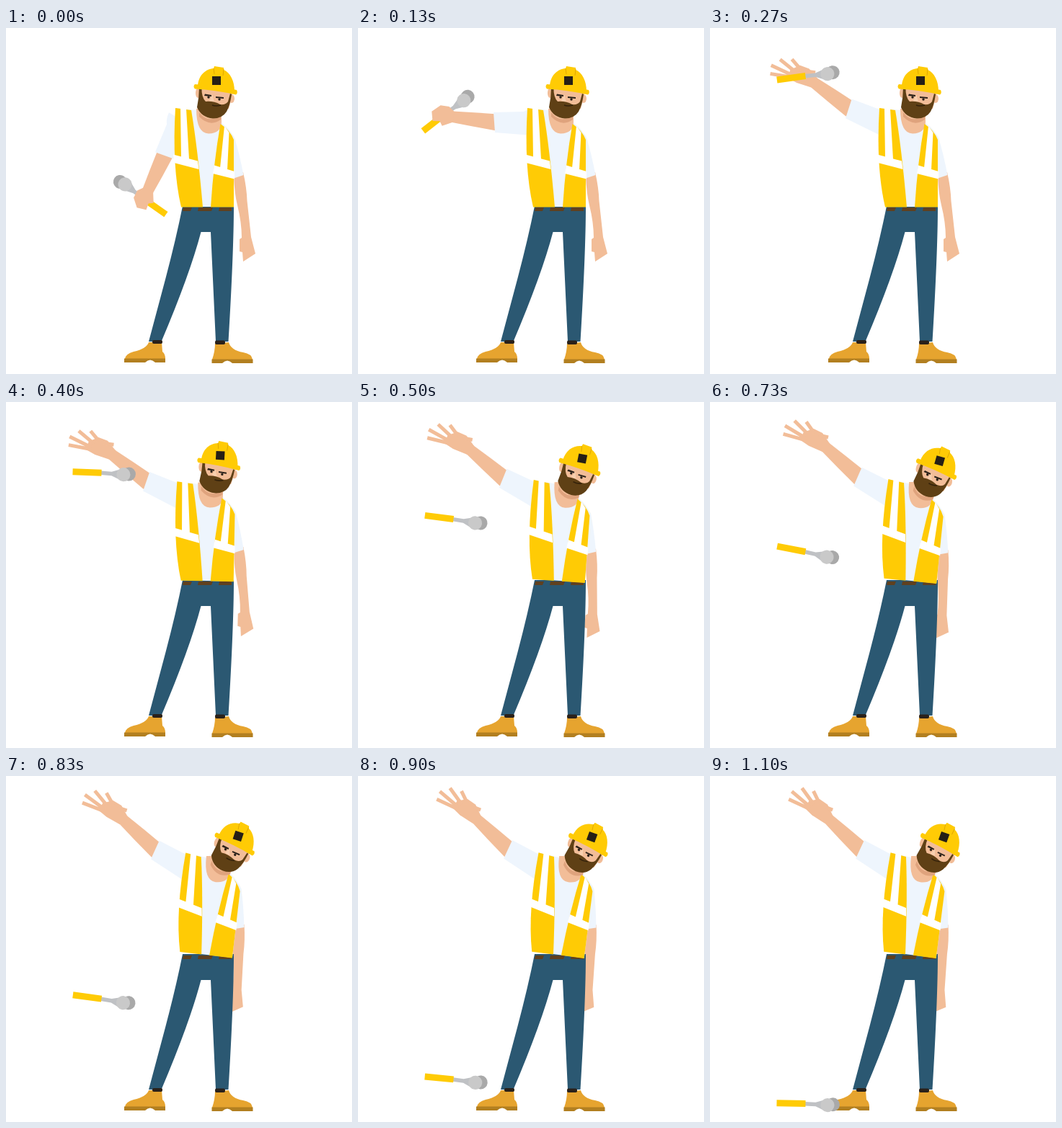
An HTML page for the animation above (1130 ms loop, 480 px wide and 480 px high).

```html
<!DOCTYPE html>
<html lang="en">
<head>
<meta charset="utf-8">
<title>Hammer drop</title>
<style>
  html, body { margin: 0; width: 100%; height: 100%; overflow: hidden; background: #fff; }
  svg { display: block; width: 100%; height: 100%; }
  .skin { fill: #f2bd98; }
  .shirt { fill: #eef5fd; }
  .vest { fill: #ffcb05; }
  .band { fill: #fff; }
  .jeans { fill: #2b5872; }
  .belt { fill: #5f401f; }
  .boot { fill: #e6a42f; }
  .sole { fill: #b27f20; }
  .hair { fill: #5f4015; }
  .dark { fill: #2a211a; }
  .finger { stroke: #f2bd98; stroke-width: 5; fill: none; }
</style>
</head>
<body>
<svg viewBox="0 0 480 480">
  <g id="rest">
    <path class="skin" d="M313 200 L329 200 Q334 222 334.500 240 L340 290 L346 313 L329 324 L328 311 L324 310 L324 293 L327 291 Q327 270 321 246 Q317 230 316 205Z"/>
    <path class="shirt" d="M300 138 Q312 143 317 152 Q324 175 329.500 204 L316 208.500 L300 208Z"/>
  </g>

  <path class="jeans" d="M245 247 H316 Q316 310 308.500 435 H291 L284 283 H270.500 Q255 342 215.500 435 H198 L221.500 347 Q236 292 245 247Z"/>
  <path class="belt" d="M246 249 H258 L256 254 H245Z M267 249 H287 L285 254 H266Z M296 249 H313 V254 H295Z"/>

  <path class="boot" d="M198 436 H216 L217 449 Q221 452 221 459 H165 Q166 452 177 449 Q195 445 198 436Z"/>
  <path class="sole" d="M164 458.500 H221 V464 H207 Q200 457 193 464 H164Z"/>
  <rect class="dark" x="203" y="433" width="14" height="5" rx="2"/>
  <path class="boot" d="M290 438 L309 436 Q312 447 329 450 Q341 452 342 460 H286 Q290 448 290 438Z"/>
  <path class="sole" d="M285.500 459.500 H342.500 V465 H314 Q307 458 300 465 H285.500Z"/>
  <rect class="dark" x="290" y="433.500" width="14" height="5.500" rx="2"/>

  <g id="torso">
    <g id="arm">
      <g id="fore">
        <path class="skin" d="M14 -11 L2 -12 Q-30 -10 -64 -7 L-64 8 Q-30 10 2 11 L14 8Z"/>
        <g id="open">
          <path class="skin" d="M-60 -7 L-78 -11 L-91 -7 L-98 6 L-94 17 L-80 15 L-60 8Z"/>
          <path class="finger" d="M-88 12 L-117 27 M-90 10 L-123 17 M-90 4 L-118 3 M-86 -3 L-105 -7 M-80 -5 L-68 -12"/>
        </g>
      </g>
      <path class="shirt" d="M-52 -13 L-50 15 L2 19 L6 -18 Q-4 -18 -10 -14Z"/>
    </g>
    <path class="shirt" d="M236 111 L264 114 L299 132 Q312 141 316 153 V248 H243Z"/>
    <path class="skin" d="M264 112 Q264 146 281 146.500 Q299 146 299 130 V108Z"/>
    <path class="vest" d="M235 111 L257 114 Q266 168 273 248.500 H243 Q230 193 235 111Z"/>
    <path class="vest" d="M297.500 133 Q311 142 316 155 V248.500 H284 Q288 186 297.500 133Z"/>
    <path class="band" d="M242 111 L250 112 L254 182 L243 179Z M232 175.500 L266 184.500 L267.500 196 L233 187Z"/>
    <path class="band" d="M303 136 L309.500 145 L307 197 L297 194Z M289 190.500 L317 199 V209.500 L287 202Z"/>

    <g id="head">
      <path fill="#dfa37d" d="M268 117 Q280 134 298 120 L298 127 Q283 138 268 123Z"/>
      <ellipse class="skin" cx="266.500" cy="90" rx="3.500" ry="7"/>
      <ellipse class="skin" cx="313" cy="98" rx="4" ry="6"/>
      <path class="skin" d="M267 82 L315 88 L309 112 L272 112Z"/>
      <path class="hair" d="M268 82 L271.500 83 Q271 96 277 102 Q288 101 297 106 Q305 107 308 102 L311 91 L313 92 Q311 107 306 116 Q300 125.500 287 125.500 Q271 124 265 110 Q268 96 268 82Z"/>
      <path class="dark" d="M276 91.500 L285 93 L285 95 L275 94Z M291 95 L302 96 L302 98 L291 97Z"/>
      <circle class="dark" cx="281" cy="96" r="1.700"/>
      <circle class="dark" cx="296" cy="99" r="1.700"/>
      <path fill="#f8d0b0" d="M286 93 L289 102 L282 101Z"/>
      <path d="M286 107 Q291 109 298 107" stroke="#33210b" stroke-width="1.600" fill="none"/>
      <path class="vest" d="M266 81 C267 65 277 57 288 56 L289 53 L302 55 L302 58 C311 62 317 73 317 88Z"/>
      <path d="M288 56 L289 64 M302 57 L301 66" stroke="#e0a800" stroke-width="1" fill="none"/>
      <path class="vest" d="M262 78 Q290 80 320 86 Q322 90 319 92.500 Q290 86 262 84.500 Q259 81 262 78Z"/>
      <rect x="286" y="67" width="12" height="12" fill="#251f16"/>
    </g>
  </g>

  <g id="burst" fill="#ffcb05"></g>

  <g id="hammer">
    <path fill="#bfc1c4" d="M3 -2.500 L18 -2 L28 -5 L28 8 L18 3.500 L3 3Z"/>
    <circle cx="42" cy="0.500" r="9.500" fill="#a9a9a9"/>
    <circle cx="34.500" cy="1.500" r="9.600" fill="#c9c9c9"/>
    <rect x="-36" y="-4.500" width="40" height="9" fill="#ffcb05"/>
  </g>
  <path id="fist" class="skin" d="M-58 -7 L-66 -13 L-78 -13 L-89 -3 L-86 10 L-76 9 L-72 15 L-58 8Z"/>
</svg>

<script>
const LOOP = 1130, RELEASE = 270;
const HIP = '280 232', ELBOW = [-50, 1], SHOULDER = [240, 130];
const $ = id => document.getElementById(id);
const put = (id, tf) => $(id).setAttribute('transform', tf);
const show = (id, on) => $(id).setAttribute('visibility', on ? 'visible' : 'hidden');

// rows: time, value, power of the ease leading to it
const lean = [[0, 0], [300, 0], [400, 1.1, 1.6], [530, 5], [630, 5.3], [730, 5.8], [900, 7.2], [LOOP, 7.2]];
const lift = [[0, -66], [130, 0], [230, 22, .7], [LOOP, 22]];
const bend = [[0, 2], [130, 8], [230, 15], [LOOP, 15]];
const wave = [[0, 0], [730, 0], [900, 8], [LOOP, 8]];
const reach = [[0, .93], [130, 1], [LOOP, 1]];
const spin = [[0, 215], [130, 322], [270, 352], [400, 362], [530, 369], [730, 371], [900, 365.5], [930, 361], [LOOP, 361]];
const fall = [[RELEASE, 67], [400, 98, 1.4], [530, 188, 1.3], [630, 192], [730, 207, 1.4], [900, 420.5, 1.4], [930, 454.5], [LOOP, 454.5]];

// each burst: start, end
const bursts = [[530, 700], [930, 1070]];
// each bolt: x, y, size, turn
const bolts = [[-47, -37, .8, 80], [33, -44, 1, 0], [55, -1, .5, 55], [50, 23, .75, 75], [-28, 41, 1.1, -8], [-57, 0, .6, 30]];
const BOLT = 'M10 -10 L-8 1 L-1 2 L-9 12 L9 0 L2 -1Z';

function at(keys, t) {
  let i = 1;
  while (i < keys.length - 1 && t > keys[i][0]) i++;
  const [t0, a] = keys[i - 1], [t1, b, p = 1] = keys[i];
  const u = Math.min(1, Math.max(0, (t - t0) / (t1 - t0)));
  return a + (b - a) * u ** p;
}

function turn([x, y], deg) {
  const r = deg * Math.PI / 180, c = Math.cos(r), s = Math.sin(r);
  return [x * c - y * s, x * s + y * c];
}

const marks = bolts.map(() => {
  const p = document.createElementNS('http://www.w3.org/2000/svg', 'path');
  p.setAttribute('d', BOLT);
  return $('burst').appendChild(p);
});

function drawBurst(t, x, y) {
  const b = bursts.find(([from, to]) => t >= from && t < to);
  show('burst', b);
  if (!b) return;
  const spread = .55 + .45 * Math.min(1.2, (t - b[0]) / 100) ** .6;
  marks.forEach((m, i) => {
    const [dx, dy, size, deg] = bolts[i];
    m.setAttribute('transform',
      `translate(${x + 28 + dx * spread} ${y + dy * spread}) rotate(${deg}) scale(${size})`);
  });
}

function draw(t) {
  const tilt = at(lean, t), up = at(lift, t), flex = at(bend, t), len = at(reach, t);
  const held = t < RELEASE;
  const body = `rotate(${tilt} ${HIP})`;
  const arm = `translate(${SHOULDER}) rotate(${up})`;
  const fore = `translate(${ELBOW}) rotate(${flex}) scale(${len} 1)`;

  put('torso', body);
  put('rest', `${body} rotate(${tilt * .42} 320 163)`);
  put('head', `rotate(${tilt * 1.78} 267 138)`);
  put('arm', arm);
  put('fore', fore);
  put('open', `rotate(${at(wave, t)} -64 0)`);
  put('fist', `${body} ${arm} ${fore}`);
  show('fist', held);
  show('open', !held);

  let x = 128.5, y = at(fall, t);
  if (held) {
    const e = turn(ELBOW, up), h = turn([-74 * len, 0], up + flex);
    x = SHOULDER[0] + e[0] + h[0] + 2;
    y = SHOULDER[1] + e[1] + h[1];
  }
  put('hammer', `translate(${x} ${y}) rotate(${at(spin, t)})`);
  drawBurst(t, x, y);
}

// thirty steps a second, on whole hundredths
const stepStart = i => Math.round(i * 10 / 3) * 10;

function tick(now) {
  const t = now % LOOP;
  let i = Math.ceil(t * .03) + 1;
  while (stepStart(i) > t) i--;
  draw(stepStart(i));
  requestAnimationFrame(() => tick(performance.now() - born));
}
const born = performance.now();
tick(0);
</script>
</body>
</html>
```
